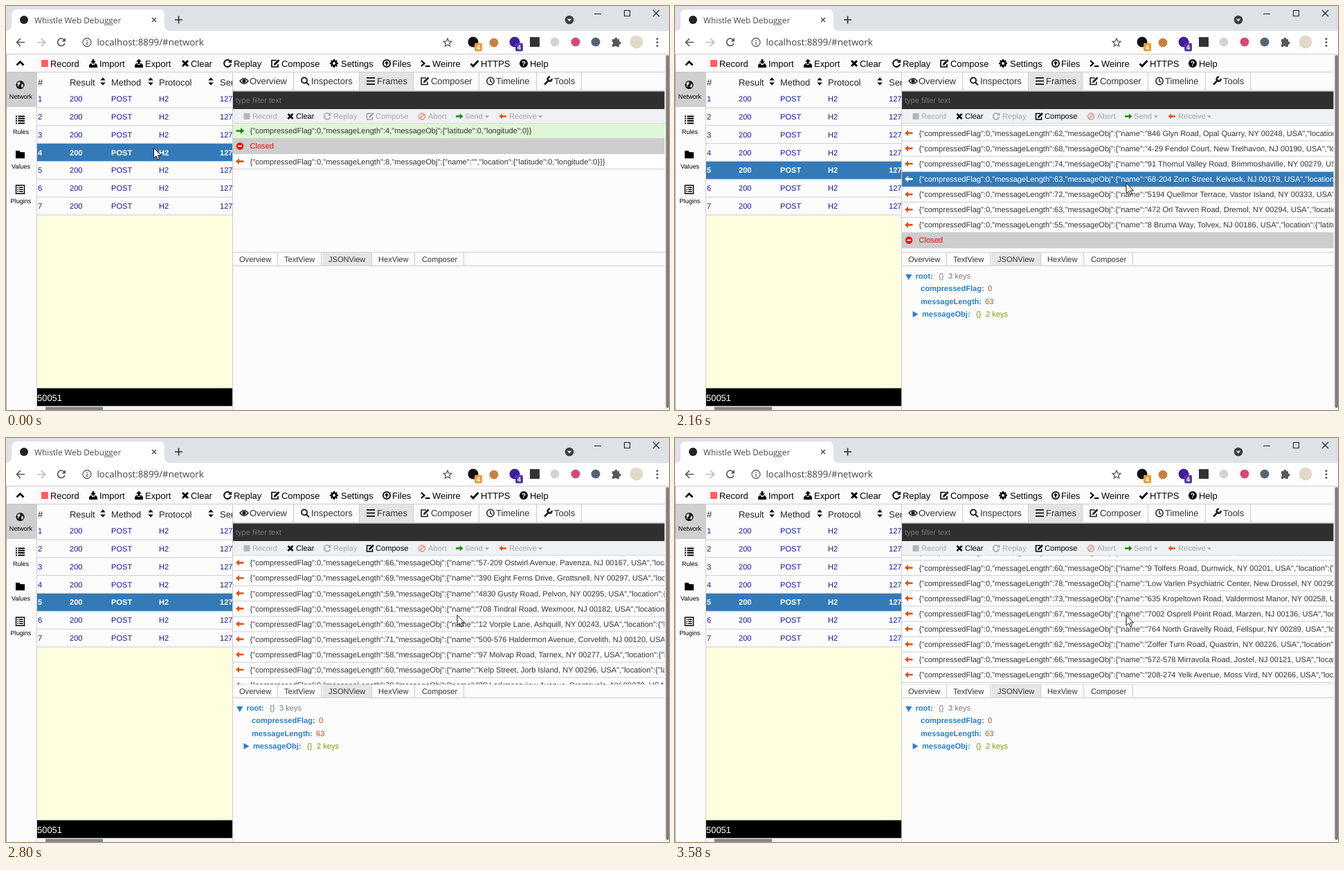
Recreate the animation shown at these times as an HTML page. Size 958x584 px, loop 4.82 s.

```html
<!DOCTYPE html>
<html lang="en">
<head>
<meta charset="utf-8">
<title>Whistle Web Debugger</title>
<style>
html, body { margin: 0; width: 100%; height: 100%; overflow: hidden; background: #fcfcfc; }
svg { display: block; width: 100vw; height: 100vh; font-family: "Liberation Sans", Arial, sans-serif; text-rendering: geometricPrecision; }
text { white-space: pre; }
</style>
</head>
<body>
<svg viewBox="0 0 958 584">
  <clipPath id="table"><path d="M45 96H327V552H45Z"/></clipPath>
  <clipPath id="list"><path d="M328 170.5H951.5V356H328Z"/></clipPath>
  <g id="fixed"></g>
  <g id="live"></g>
</svg>
<script>
const LOOP = 4820;
const SMALL = 11.08, MEDIUM = 12.95;
const BLUE = '#337ab7', GREEN = '#0b8a0b', ORANGE = '#e2530f', RED = '#ff5f5f', LINE = '#ccc', FADED = '#a5a5a5';

// Newest message first
const addresses = `8 Bruma Way, Tolvex, NJ 00186
472 Orl Tavven Road, Dremol, NY 00294
5194 Quellmor Terrace, Vastor Island, NY 00333
68-204 Zorn Street, Kelvask, NJ 00178
91 Thornul Valley Road, Brimmoshaville, NY 00279
4-29 Fendol Court, New Trelhavon, NJ 00190
846 Glyn Road, Opal Quarry, NY 00248
73 Velmoran Road, Dulverix, NY 00245
682-694 Orvellston Drive, Plastonmer Township, NJ 00175
300 Mount Grelvond Avenue, Tasvel, NJ 00110
574 Misty Fen Road, Glen Ostrell, NJ 00182
838 Tumblen Hills Road, Farlundery, NY 00254
29 Larkmossview Avenue, Brontavelo, NY 00270
Kelp Street, Jorb Island, NY 00296
97 Molvap Road, Tarnex, NY 00277
500-576 Haldermon Avenue, Corvelith, NJ 00120
12 Vorple Lane, Ashquill, NY 00243
708 Tindral Road, Wexmoor, NJ 00182
4830 Gusty Road, Pelvon, NY 00295
390 Eight Ferns Drive, Grottsnell, NY 00297
57-209 Ostwirl Avenue, Pavenza, NJ 00167
64 Dorvel Avenue, New Taskrin, NY 00255
944 Trumvale Avenue, Eastquill, NJ 00190
51 Fern 9th Street, New Orlavinder, NJ 00174
820-824 Borsk Hill Road, Yorb Lake, NY 00283
300-344 Velmtown Road, Dormictown, NJ 00125
728 Garvolen Ridge Road, Toskern, PA 00337
35 Nimbrel Court, Haskovar, NY 00276
208-274 Yelk Avenue, Moss Vird, NY 00266
572-578 Mirravola Road, Jostel, NJ 00121
Zolfer Turn Road, Quastrin, NY 00226
764 North Gravelly Road, Fellspur, NY 00289
7002 Osprell Point Road, Marzen, NJ 00136
635 Kropeltown Road, Valdermost Manor, NY 00258
Low Varlen Psychiatric Center, New Drossel, NY 00290
9 Tolfers Road, Durnwick, NY 00201
44 Pinvale Road, Ostmere, NY 00231`.split('\n').map(line => line + ', USA');

const circle = r => `M${-r} 0A${r} ${r} 0 1 0 ${r} 0A${r} ${r} 0 1 0 ${-r} 0Z`;

// name: [filled path, stroked path, stroke width]
const icons = {
  square: ['M-5-5H5V5H-5Z'],
  import: ['M-6 6V2.5L-4 0H-2V2H2V0H4L6 2.5V6ZM-1.5-6H1.5V-3H4L0 1L-4-3H-1.5Z'],
  export: ['M-6 6V2.5L-4 0H-2V2H2V0H4L6 2.5V6ZM0-6.5L4-2.5H1.5V1H-1.5V-2.5H-4Z'],
  cross: ['', 'M-4-4L4 4M4-4L-4 4', 3],
  replay: ['M6-6V-1H1Z', 'M4-3.2A5 5 0 1 0 5 1', 1.8],
  edit: ['M-2 3L-1.5 0L4.5-6L6.5-4L.5 2Z', 'M2-4.5H-5V5H4V1', 1.6],
  gear: ['', circle(3.2) + 'M0-6V-4M0 4V6M-6 0H-4M4 0H6M-4.2-4.2L-3-3M3 3L4.2 4.2M4.2-4.2L3-3M-3 3L-4.2 4.2', 2.4],
  up: ['M0-3.6L3.2 0H1V3H-1V0H-3.2Z', circle(5.2), 1.7],
  prompt: ['', 'M-6-4L-1.5 0L-6 4M0 4H6.5', 2.2],
  check: ['', 'M-5.5 .5L-2 4L5.5-4', 2.8],
  disc: [circle(6)],
  eye: [circle(2.7), 'M-6 0Q0-7.5 6 0Q0 7.5-6 0Z', 1.5],
  search: ['', 'M-5-1A4 4 0 1 0 3-1A4 4 0 1 0-5-1M2 2L6 6', 2],
  bars: ['', 'M-6-4.5H6M-6 0H6M-6 4.5H6', 2.2],
  clock: ['', circle(5.2) + 'M0-3.5V.5L2.5 1.5', 1.5],
  wrench: ['', 'M-5 5L2-2M5.5-3.5A3 3 0 1 1 3-5.8', 2.6],
  ban: ['', circle(5) + 'M-3.4 3.4L3.4-3.4', 1.7],
  left: ['M-6 0L-1-4.5V-1.3H5.5V1.3H-1V4.5Z'],
  right: ['M6 0L1-4.5V-1.3H-5.5V1.3H1V4.5Z'],
  caret: ['M-3.5-1.7H3.5L0 1.9Z'],
  sort: ['M-4-1.7L0-6L4-1.7ZM-4 1.7L0 6L4 1.7Z'],
  list: ['', 'M-6.5-5H-4.5M-3-5H6.5M-6.5-1.7H-4.5M-3-1.7H6.5M-6.5 1.7H-4.5M-3 1.7H6.5M-6.5 5H-4.5M-3 5H6.5', 2],
  folder: ['M-6.5-5.5H-1L0-3.5H6.5V5.5H-6.5Z'],
  sheet: ['', 'M-6-6H6V6H-6ZM-4-3H-2.5M-1.5-3H4M-4 0H-2.5M-1.5 0H4M-4 3H-2.5M-1.5 3H4', 1.4],
};

const rect = (x, y, w, h, fill, extra = '') => `<rect x="${x}" y="${y}" width="${w}" height="${h}" fill="${fill}" ${extra}/>`;
const stroke = (d, color = LINE, width = 1) => `<path d="${d}" fill="none" stroke="${color}" stroke-width="${width}"/>`;
const dot = (x, y, r, fill) => `<circle cx="${x}" cy="${y}" r="${r}" fill="${fill}"/>`;
// y is the vertical middle of the line
const text = (x, y, str, fill = '#222', size = SMALL, extra = '') =>
  `<text x="${x}" y="${y + size * 0.36}" fill="${fill}" font-size="${size}" ${extra}>${str}</text>`;
const icon = (name, x, y, color = '#000', scale = 1) => {
  const [fill, line = '', width = 0] = icons[name];
  return `<g transform="translate(${x} ${y}) scale(${scale})"><path d="${fill}" fill="${color}"/>${stroke(line, color, width)}</g>`;
};
const BOLD = 'font-weight="bold"', MIDDLE = 'text-anchor="middle"';

const badge = (x, y, color) => rect(x - 5.5, y - 6, 11, 12, color, 'rx="2"') + text(x, y, '4', '#fff', 9.5, `${BOLD} ${MIDDLE}`);

function browserChrome() {
  const ui = 'font-family="Open Sans, Noto Sans, sans-serif"';
  return rect(0, 0, 958, 36, '#dee1e6') + rect(0, 36, 958, 34, '#fff')
    + '<path d="M0 36Q8 36 8 28V13Q8 5 16 5H221Q229 5 229 13V28Q229 36 237 36Z" fill="#fff"/>'
    + dot(26, 20, 6, '#222') + text(41, 20.5, 'Whistle Web Debugger', '#45484c', 11.8, ui)
    + stroke('M211 17L217 23M217 17L211 23', '#444', 1.4) + stroke('M244 20H255M249.5 14.5V25.5', '#333', 1.7)
    + dot(814, 20, 6.3, '#3c4043') + icon('caret', 814, 20.3, '#fff', 0.9)
    + stroke('M850 11.5H860M893.5 6.5H901.5V14.5H893.5ZM935 6L944 15M944 6L935 15', '#222', 1.1)
    + stroke('M27 52.5H16M21 47L15.5 52.5L21 58', '#55585c', 1.7)
    + stroke('M45 52.5H56M51 47L56.5 52.5L51 58', '#babcbe', 1.7)
    + stroke('M84.5 49.5A5.3 5.3 0 1 0 85 54', '#55585c', 1.7) + '<path d="M86 46V51.5H80.5Z" fill="#55585c"/>'
    + `<g transform="translate(117 52.5)">${stroke(circle(6), '#5f6368', 1.3)}${stroke('M0-3.2V-1.6M0-.5V3.4', '#5f6368', 1.5)}</g>`
    + text(131.5, 52.2, 'localhost:8899/#network', '#3f4246', 13.3, ui)
    + stroke('M638 46.8L639.7 50.8L644 51.2L640.7 54L641.7 58.2L638 56L634.3 58.2L635.3 54L632 51.2L636.3 50.8Z', '#55585c', 1.3)
    + dot(675, 52, 7.5, '#111') + badge(682.5, 59.5, '#f0a030')
    + dot(705, 53, 6.5, '#c9803e') + dot(735, 52, 7.5, '#3f1f9c') + badge(741.5, 59.5, '#5a35a8')
    + rect(757, 45, 14, 14, '#333') + dot(793, 52, 6.5, '#d4d4d4') + dot(823, 52, 6.5, '#d9487d') + dot(852, 52, 6.5, '#596273')
    + '<path d="M876 48H879.5A2 2 0 1 1 883.3 48H886V51.5A2 2 0 1 1 886 55.3V59H882.5A2 2 0 0 0 878.8 59H876V55.5A2 2 0 0 0 876 51.8Z" fill="#55585c"/>'
    + dot(911, 52, 9.5, '#e3d9c9')
    + [47.5, 52.5, 57.5].map(y => dot(941, y, 1.5, '#55585c')).join('')
    + stroke('M0 69.5H958');
}

function appFrame() {
  const menu = [
    ['square', 56, 'Record', 64], ['import', 126, 'Import', 135], ['export', 192, 'Export', 201], ['cross', 259, 'Clear', 267],
    ['replay', 320, 'Replay', 329], ['edit', 389, 'Compose', 398], ['gear', 474, 'Settings', 484], ['up', 550, 'Files', 558],
    ['prompt', 606, 'Weinre', 616], ['check', 677, 'HTTPS', 686], ['disc', 748, 'Help', 757]];
  const nav = [['disc', 'Network'], ['list', 'Rules'], ['folder', 'Values'], ['sheet', 'Plugins']];
  const tabs = [['eye', 344, 'Overview', 352, 416], ['search', 432, 'Inspectors', 441, 511], ['bars', 527, 'Frames', 536, 589],
    ['edit', 605, 'Composer', 614, 684], ['clock', 700, 'Timeline', 708, 767], ['wrench', 783, 'Tools', 792, 832]];
  const views = [['Overview', 337, 393], ['TextView', 402, 456], ['JSONView', 466, 529], ['HexView', 538, 591], ['Composer', 601, 662]];

  return rect(0, 70, 958, 514, '#fcfcfc')
    + menu.map(([name, x, label, tx]) => icon(name, x, 83, name === 'square' ? RED : '#000') + text(tx, 83, label, '#000', MEDIUM)).join('')
    + text(748, 83, '?', '#fff', 10.5, `${BOLD} ${MIDDLE}`)
    + stroke('M15.5 85.5L20.5 80.5L25.5 85.5', '#000', 2.6)
    + rect(1, 96, 43, 50, '#cfcfcf')
    + nav.map(([name, label], i) => icon(name, 20.5, 114 + i * 50.4) + text(21.5, 131 + i * 50.4, label, '#000', 9.1, MIDDLE)).join('')
    + '<path d="M16 111L20 109L21 112L18 115L20 118L17 116ZM22 114L25 112V117L22 118Z" fill="#cfcfcf"/>'
    + rect(45, 303, 282, 249, '#ffffe0') + rect(45, 552.5, 282, 26, '#000') + text(45, 566, '50051', '#fff', MEDIUM)
    + rect(45, 578.5, 282, 6, '#f4f4f4') + rect(57, 579.5, 83, 5, '#858585')
    + '<g clip-path="url(#table)">'
    + [['#', 46], ['Result', 92], ['Method', 152], ['Protocol', 221], ['Ser', 309]].map(([label, x]) => text(x, 110.5, label, '#222', MEDIUM)).join('')
    + [140, 209, 296].map(x => icon('sort', x, 109, '#111', 0.95)).join('') + '</g>'
    + rect(511, 96, 78, 26, '#e4e4e4')
    + tabs.map(([name, x, label, tx, edge]) => icon(name, x, 108.5, '#222') + text(tx, 108.5, label, '#333', MEDIUM) + stroke(`M${edge - .5} 96V122`)).join('')
    + rect(328, 149, 624, 21.5, '#f0f1f2')
    + rect(328, 123.5, 623.5, 25.5, '#2f2f2f') + text(332, 136, 'type filter text', '#777')
    + rect(457, 356, 72, 20, '#e6e6e6')
    + views.map(([label, x, edge]) => text(x, 366, label, '#333') + stroke(`M${edge - .5} 356V376`)).join('')
    + stroke('M0 95.5H952M328 122.5H952M328 170H952M328 356H952M328 375.5H952M44.5 96V584M327.5 96V584')
    + stroke('M.5 70V584', '#aaa')
    + rect(952, 70, 6, 514, '#f6f6f6') + rect(953.5, 71, 4.5, 510, '#7f7f7f', 'rx="2"');
}

function requestTable(selected) {
  let out = '<g clip-path="url(#table)">';
  for (let i = 0; i < 7; i++) {
    const y = 134 + i * 25.85, active = i === selected;
    if (active) out += rect(45, y - 12.5, 282, 25.5, BLUE);
    out += [i + 1, '200', 'POST', 'H2', '127'].map((cell, c) =>
      text([46, 92, 152, 221, 309][c], y, cell, active ? '#fff' : '#1515a0', SMALL, active ? BOLD : '')).join('');
    out += stroke(`M45 ${y + 13}H327`);
  }
  return out + '</g>';
}

function frameToolbar(open, composable) {
  const buttons = [
    ['square', 348, 'Record', 356, open, open ? RED : '#b5b5b5'], ['cross', 411, 'Clear', 419, true],
    ['replay', 464, 'Replay', 473, false], ['edit', 526, 'Compose', 534, composable],
    ['ban', 601, 'Abort', 610, open, open ? '#e8402f' : '#ec8b80'],
    ['right', 655, 'Send', 663, open, GREEN], ['left', 718, 'Receive', 727, open, ORANGE]];
  return buttons.map(([name, x, label, tx, on, tint]) => {
    const color = on ? '#000' : FADED;
    return icon(name, x, 159.5, tint || color, 0.9) + text(tx, 159.5, label, color);
  }).join('') + [695, 772].map(x => icon('caret', x, 160, open ? '#000' : FADED, 0.9)).join('');
}

function messageRow(y, kind, content, background = '#fff', color = '#333') {
  const mark = kind === 'closed'
    ? dot(338, y, 5.2, '#e60f0f') + rect(335, y - 1, 6, 2, '#fff')
    : icon(kind, 338, y, color === '#fff' ? color : kind === 'left' ? ORANGE : GREEN);
  return rect(328, y - 10.6, 624, 22.1, background) + stroke(`M328 ${y + 11.2}H952`) + mark + text(352.5, y, content, color);
}
const closedRow = y => messageRow(y, 'closed', 'Closed', '#cdcdcd', '#f00');
const messageHead = length => `{"compressedFlag":0,"messageLength":${length},"messageObj":{`;

function initialList() {
  return messageRow(180.5, 'right', messageHead(4) + '"latitude":0,"longitude":0}}', '#e0f6d8')
    + closedRow(202.5)
    + messageRow(224.6, 'left', messageHead(8) + '"name":"","location":{"latitude":0,"longitude":0}}}');
}

function streamList(scroll, selected) {
  return closedRow(338.5 + scroll) + addresses.map((address, i) => {
    const y = 338.5 - 22.1 * (i + 1) + scroll;
    if (y < 150 || y > 370) return '';
    const content = `${messageHead(address.length + 21)}"name":"${address}","location":{"latitude":40`;
    return i === selected ? messageRow(y, 'left', content, BLUE, '#fff') : messageRow(y, 'left', content);
  }).join('');
}

function jsonTree() {
  const key = (x, y, label) => text(x, y, label, '#2a7fcb', SMALL, BOLD);
  return '<path d="M333 388H342.500L337.700 396ZM343.500 441L351.500 445.500L343.500 450Z" fill="#2a7fcb"/>'
    + key(347.5, 390.5, 'root:') + text(381, 390.5, '{}', '#777') + text(395, 390.5, '3 keys', '#777')
    + key(355, 408.5, 'compressedFlag:') + text(452, 408.5, '0', '#cb4b16')
    + key(355, 427, 'messageLength:') + text(448, 427, '63', '#cb4b16')
    + key(357, 445.5, 'messageObj:') + text(435, 445.5, '{}', '#859900') + text(449, 445.5, '2 keys', '#859900');
}

// Progress 0..1 in equal hard steps, the first at start and the last at end
function stepped(t, start, end, steps) {
  if (t < start) return 0;
  return Math.min(1, (Math.floor((t - start) * (steps - 1) / (end - start) + 1e-6) + 1) / steps);
}
const easeOut = (p, power) => 1 - (1 - p) ** power;
const smooth = p => p * p * (3 - 2 * p);

const NOTCH = 92.1;
const scrollAt = t => NOTCH * (4 * easeOut(stepped(t, 2450, 2950, 13), 1.506)
  + easeOut(stepped(t, 3010, 3160, 4), 1.566)
  + 2 * easeOut(stepped(t, 3400, 3580, 5), 1.5));

function cursor(t) {
  const moves = [[370, 570, 6, 6, 31], [1160, 1520, 10, 430.5, 37], [1890, 1980, 3, 2, -17]];
  let x = 213.5, y = 205;
  for (const [start, end, steps, dx, dy] of moves) {
    const p = smooth(stepped(t, start, end, steps));
    x += dx * p;
    y += dy * p;
  }
  return `<path transform="translate(${x} ${y})" d="M0 0V15L3.500 11.800L6 17L8.300 16L5.900 11H10.600Z" fill="#fff" stroke="#111"/>`;
}

function scene(t) {
  const picked = t >= 2130;
  const list = t < 720 ? initialList() : t < 940 ? '' : streamList(scrollAt(t), picked ? 3 : -1);
  return requestTable(t < 720 ? 3 : 4)
    + frameToolbar(t >= 720 && t < 940, picked)
    + `<g clip-path="url(#list)">${list}</g>`
    + (t >= 2160 ? jsonTree() : '')
    + cursor(t);
}

const live = document.getElementById('live');
let shown = '';
function tick() {
  const markup = scene(performance.now() % LOOP);
  if (markup !== shown) live.innerHTML = shown = markup;
  requestAnimationFrame(tick);
}
document.getElementById('fixed').innerHTML = browserChrome() + appFrame();
tick();
</script>
</body>
</html>
```
